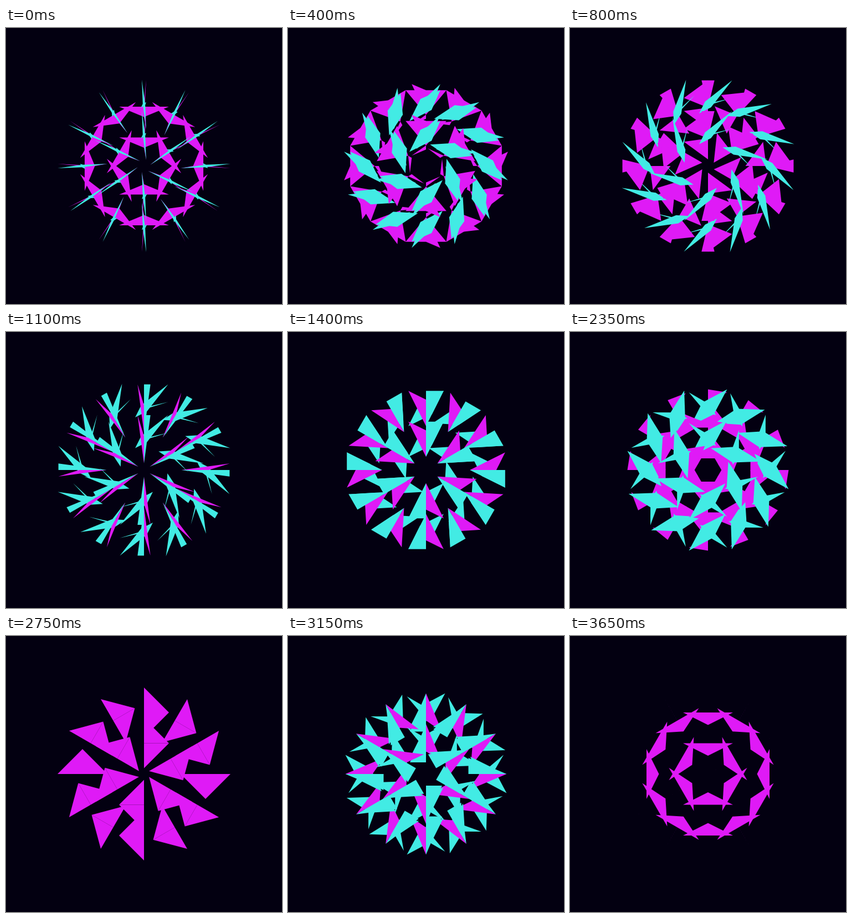
These frames come from a looping animation (498 px wide and 498 px high, 3700 ms). An HTML page with a canvas:

```html
<!DOCTYPE html>
<html>
<head>
<meta charset="utf-8">
<style>
html, body { margin: 0; height: 100%; overflow: hidden; background: #030011; }
canvas { display: block; }
</style>
</head>
<body>
<canvas width="498" height="498"></canvas>
<script>
const ctx = document.querySelector('canvas').getContext('2d');
const MAGENTA = '#df1af6', CYAN = '#42ebe4', BACKGROUND = '#030011';
const LOOP = 3700, STEP = 50, TURN = 3600;
const SIZE = 45; // half the width of a cell

function polygon(color, ...points) {
  ctx.fillStyle = color;
  ctx.beginPath();
  points.forEach(([x, y]) => ctx.lineTo(x, y));
  ctx.fill();
}

// A kite along the direction of (x, y), widest at the cell centre
function blade(color, x, y, tip, tail, width) {
  const length = Math.hypot(x, y) || 1, dx = x / length, dy = y / length;
  polygon(color, [tip * dx, tip * dy], [-width * dy, width * dx],
    [-tail * dx, -tail * dy], [width * dy, -width * dx]);
}

// Flat faces turning in depth: c and s foreshorten their sides
function drawCell(angle) {
  const c = SIZE * Math.cos(angle), s = SIZE * Math.sin(angle);
  const absC = Math.abs(c), absS = Math.abs(s);
  const fold = [0, -s / 2];
  const left = [-s, -c], right = [s, -c], apex = [0, c];
  const facing = (c - s / 2) * s < 0;

  if (facing) {
    for (const side of [-1, 1]) {
      polygon(MAGENTA, [-c, side * absS], [0, side * absC], fold);
    }
    polygon(MAGENTA, left, right, fold);
  }

  const depth = absS * absS / SIZE;
  blade(CYAN, c, -absS, SIZE, depth, 0.55 * absC * depth / SIZE);
  blade(CYAN, 1, -1, absC * Math.SQRT2, 2 * absC * absS / SIZE, 0.67 * absC * absS / SIZE);

  if (!facing) {
    polygon(CYAN, right, apex, [0, -c]);
    polygon(MAGENTA, left, apex, fold);
  }
}

function drawRing(count, radius, angle) {
  for (let n = 0; n < count; n++) {
    ctx.save();
    ctx.translate(249, 249);
    ctx.rotate(n * 2 * Math.PI / count);
    ctx.translate(0, -radius);
    drawCell(angle);
    ctx.restore();
  }
}

function render(now) {
  const t = Math.floor(now % LOOP / STEP) * STEP;
  const angle = (t - 950) / TURN * 2 * Math.PI;
  ctx.fillStyle = BACKGROUND;
  ctx.fillRect(0, 0, 498, 498);
  drawRing(12, 111, angle);
  drawRing(6, 55.5, angle);
}

const start = performance.now();
function tick() {
  render(performance.now() - start);
  requestAnimationFrame(tick);
}
tick();
</script>
</body>
</html>
```
